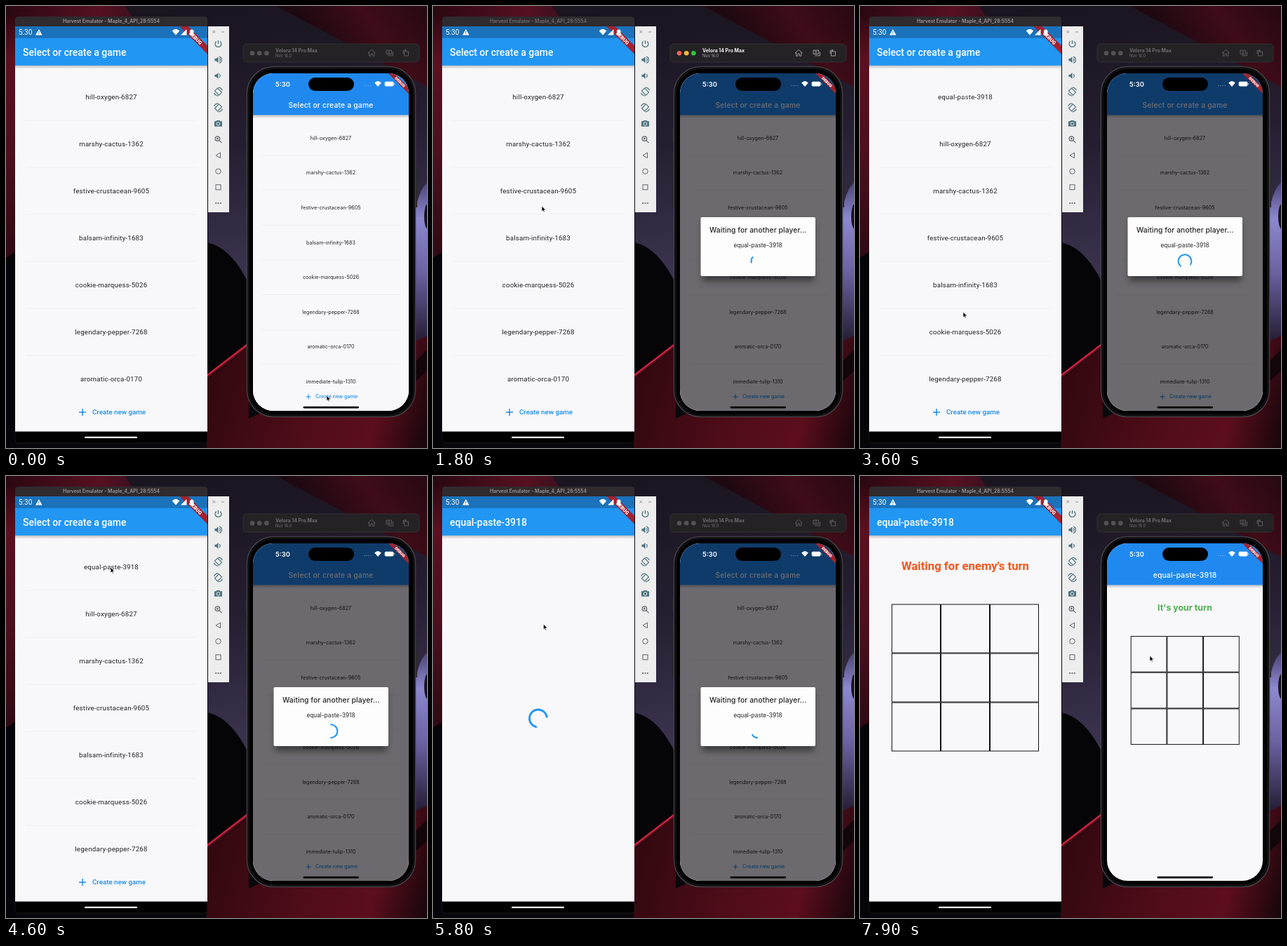
Write an HTML page that moves like this. It is 600x630 px and loops after 8 s.

```html
<!DOCTYPE html>
<html lang="en">
<head>
<meta charset="utf-8">
<title>Two emulators pairing a game</title>
<style>
html, body { margin: 0; width: 100%; height: 100%; overflow: hidden; background: #08070b; }
svg { display: block; width: 600px; height: 630px; }
.droid { font-family: Roboto, sans-serif; }
.phone { font-family: Inter, sans-serif; }
</style>
</head>
<body>
<svg id="stage" viewBox="0 0 600 630"></svg>
<script>
const BLUE = '#2196f3', PAPER = '#f8f7fa', INK = '#242326';
const games = ['hill-oxygen-6827', 'marshy-cactus-1362', 'festive-crustacean-9605', 'balsam-infinity-1683',
  'cookie-marquess-5026', 'legendary-pepper-7268', 'aromatic-orca-0170', 'immediate-tulip-1310'];
const newGame = 'equal-paste-3918', listTitle = 'Select or create a game';

const clamp = x => Math.max(0, Math.min(1, x));
const span = (t, from, to) => clamp((t - from) / (to - from));
const easeOut = (x, n) => 1 - (1 - x) ** n;

const rect = (x, y, w, h, fill, more = '') => `<rect x="${x}" y="${y}" width="${w}" height="${h}" fill="${fill}" ${more}/>`;
const path = (d, fill, more = '') => `<path d="${d}" fill="${fill}" ${more}/>`;
const line = (d, color, w = 1, more = '') => path(d, 'none', `stroke="${color}" stroke-width="${w}" ${more}`);
const disc = (x, y, r, fill, more = '') => `<circle cx="${x}" cy="${y}" r="${r}" fill="${fill}" ${more}/>`;
const text = (x, y, size, str, fill, weight = 400, more = '') =>
  `<text x="${x}" y="${y}" font-size="${size}" fill="${fill}" font-weight="${weight}" ${more}>${str}</text>`;
const mid = 'text-anchor="middle"';
const group = (attrs, body) => `<g ${attrs}>${body}</g>`;
const at = (x, y, body) => group(`transform="translate(${x} ${y})"`, body);
const gradient = (id, vec, ...stops) =>
  `<linearGradient id="${id}" gradientUnits="userSpaceOnUse" ${vec}>` +
  stops.map(([o, c, a = 1]) => `<stop offset="${o}" stop-color="${c}" stop-opacity="${a}"/>`).join('') + '</linearGradient>';
const vec = (x1, y1, x2, y2) => `x1="${x1}" y1="${y1}" x2="${x2}" y2="${y2}"`;

// Cubic timing curve (.4, 0, .2, 1)
function fastOutSlowIn(x) {
  let lo = 0, hi = 1, s = .5;
  for (let i = 0; i < 16; i++) {
    s = (lo + hi) / 2;
    const bx = 1.2 * s * (1 - s) ** 2 + .6 * s * s * (1 - s) + s ** 3;
    if (bx < x) lo = s; else hi = s;
  }
  return 3 * s * s * (1 - s) + s ** 3;
}

// Indeterminate ring: the arc grows, shrinks and rotates
function spinner(cx, cy, r, w, age) {
  const p = age / 1333 % 1, rot = age / 2222 % 1;
  const head = fastOutSlowIn(clamp(p * 2)), tail = fastOutSlowIn(clamp(p * 2 - 1));
  const a = Math.PI * (-.5 + tail * 1.5 + rot * 2 + p * .5);
  const sweep = Math.max(.02, (head - tail) * 1.5 * Math.PI), b = a + sweep;
  const pt = v => (cx + r * Math.cos(v)).toFixed(2) + ' ' + (cy + r * Math.sin(v)).toFixed(2);
  return line(`M${pt(a)}A${r} ${r} 0 ${+(sweep > Math.PI)} 1 ${pt(b)}`, BLUE, w);
}

function board(x, y, cell) {
  let s = '';
  for (let i = 0; i < 9; i++)
    s += rect(x + i % 3 * cell + .5, y + Math.floor(i / 3) * cell + .5, cell - 1, cell - 1, 'none', 'stroke="#111" stroke-width="1"');
  return s;
}

function list(names, x, y, step, size, left, right, spacing) {
  return names.map((n, i) => text(x, y + i * step + size * .35, size, n, INK, 400, `${mid} letter-spacing="${spacing}"`) +
    (i < names.length - 1 ? line(`M${left} ${y + (i + .5) * step}H${right}`, '#efeef1') : '')).join('');
}

const createButton = (px, py, r, tx, ty, size) =>
  line(`M${px - r} ${py}h${2 * r}M${px} ${py - r}v${2 * r}`, '#1b8ceb', r * .3) +
  text(tx, ty, size, 'Create new game', '#1b8ceb', 500);

// Corner ribbon measured in device pixels, s is the device scale
const debugBanner = (right, top, s) => group(`transform="translate(${right} ${top}) rotate(45) scale(${s})"`,
  rect(-40, 28, 80, 12, '#a3222f') + text(0, 37.7, 10.2, 'DEBUG', '#fff', 900, mid));

const wifi = (x, y, r) => path(`M${x} ${y}L${x - r} ${y - r * 1.15}Q${x} ${y - r * 2.2} ${x + r} ${y - r * 1.15}z`, '#fff');

/* ---------- fixed scenery ---------- */
const defs = '<defs>' +
  gradient('redLeft', vec(0, 0, 60, 370), [0, '#25070f'], [.2, '#5b1020'], [.55, '#4c101e'], [1, '#2a0912']) +
  gradient('topRed', vec(0, 0, 190, 0), [0, '#2a0811'], [.7, '#561021'], [1, '#38101e']) +
  gradient('violet', vec(300, 0, 350, 390), [0, '#1a151f'], [.5, '#251e31'], [1, '#3d3450']) +
  gradient('topRight', vec(470, 90, 600, 0), [0, '#1e0911'], [.5, '#3f0c18'], [1, '#260912']) +
  gradient('lilac', vec(0, 240, 0, 490), [0, '#3b3560'], [.25, '#8d87cf'], [.55, '#6c63a3'], [1, '#1c1426']) +
  gradient('bottom', vec(288, 550, 600, 630), [0, '#33080f'], [.5, '#520d1a'], [.75, '#5c0e1d'], [1, '#16060b']) +
  gradient('shade', vec(0, 0, 0, 5), [0, '#000', .22], [1, '#000', 0]) +
  '<clipPath id="droidClip"><rect x="13" y="29" width="274" height="577.5"/></clipPath>' +
  '<clipPath id="phoneClip"><rect x="352" y="96" width="222" height="481" rx="29"/></clipPath>' +
  '<filter id="soft" x="-20%" y="-30%" width="140%" height="170%"><feGaussianBlur stdDeviation="5"/></filter></defs>';

const wallpaper = rect(0, 0, 600, 630, '#08070b') +
  path('M0 0H170L190 30H0z', 'url(#topRed)') + rect(0, 14, 14, 346, 'url(#redLeft)') +
  path('M170 0H600V470L288 400V30H190z', 'url(#violet)') +
  path('M385 0H600V115z', 'url(#topRight)') +
  path('M0 359L14 350V630H0z', '#050408') +
  path('M286 337C308 341 328 359 346 396V630H286z', '#050508') +
  path('M584 288Q590 260 600 252V490L584 505z', 'url(#lilac)') +
  '<ellipse cx="601" cy="300" rx="5" ry="18" fill="#17121f"/>' +
  path('M286 532L346 486V588L600 470V630H286z', 'url(#bottom)') +
  path('M584 506L600 490V520L584 535z', '#12060b') +
  line('M286 528L346 482', '#5e1020', 5) + line('M286 527L346 481', '#d92740', 1.8);

const droidFrame = path('M13 30V20Q13 15 18 15H282Q287 15 287 20V30z', '#2f2b2f') +
  path('M13 606H287V618Q287 623 282 623H18Q13 623 13 618z', '#000', 'stroke="#29262a" stroke-width=".6"') +
  rect(112, 613.7, 75, 2.4, '#fff', 'rx="1.2"');

const droidStatus = debugBanner(287, 29, .697) + text(18, 41.3, 10, '5:30', '#fff') +
  path('M46.8 33L51.6 41.4H42z', '#fff') + line('M46.8 36v2.6M46.8 39.3v1', '#1b6fb4', 1) +
  wifi(242, 41.5, 5.2) + path('M257.5 33V41.5H249z', '#fff') +
  path('M262 34.5h1.5v-1h2.5v1h1.5V42H262z', '#fff');

const TEAL = '#4d737e', GRAY = '#606468';
const speaker = path('M-5-1.7h2.2L0-4.5v9L-2.8 1.7H-5z', TEAL) + line('M1.5-2.2a2.5 2.5 0 0 1 0 4.4', TEAL, 1.2);
const turn = line('M-5-1L-1-5L5 1L1 5zM0-6q4 0 6 4M0 6q-4 0-6-4', TEAL, 1.2);
const icons = [
  line('M-2.7-3.4a4.4 4.4 0 1 0 5.4 0M0-5V0', TEAL, 1.3),
  speaker + line('M1.5-4.6a4.8 4.8 0 0 1 0 9.2', TEAL, 1.2),
  speaker, turn, group('transform="scale(-1 1)"', turn),
  path('M-5.5-3.2h2.5l1-1.4h4l1 1.4h2.5v7.4h-11z', TEAL) + disc(0, .4, 2.3, 'none', 'stroke="#ededed" stroke-width="1"'),
  disc(-1.1, -1.1, 3.3, 'none', `stroke="${GRAY}" stroke-width="1.2"`) + line('M1.5 1.5L5 5M-2.6-1.1h3M-1.1-2.6v3', GRAY, 1.1),
  path('M3-3.8V3.8L-3.5 0z', 'none', `stroke="${GRAY}" stroke-width="1"`),
  disc(0, 0, 3.7, 'none', `stroke="${GRAY}" stroke-width="1"`),
  rect(-3.5, -3.5, 7, 7, 'none', `stroke="${GRAY}" stroke-width="1"`),
  [-3.3, 0, 3.3].map(x => disc(x, 0, 1.1, GRAY)).join('')
];
const toolbar = rect(288, 29, 30, 265, '#ededee') +
  line('M294.5 35l3.6 3.6M298.1 35l-3.6 3.6M307 37h4', '#777', .8) +
  icons.map((icon, i) => at(302.5, 54 + i * 22.7, icon)).join('');

const phoneFrame = [175, 208, 250].map((y, i) => rect(341, y, 3, i ? 37 : 18, '#29272a')).join('') +
  rect(583, 231, 3, 56, '#29272a') +
  rect(343.5, 86.5, 240, 499, '#020203', 'rx="38" stroke="#444246" stroke-width="1.5"') +
  rect(346, 89, 235, 494, 'none', 'rx="36" stroke="#17161a" stroke-width="1.5"');

const phoneStatus = group('clip-path="url(#phoneClip)"', debugBanner(574, 96, .516)) +
  rect(431, 102, 65, 19, '#000', 'rx="9.5"') + text(384, 114.6, 9.4, '5:30', '#fff', 600) +
  [511, 514, 517, 520].map(x => disc(x, 113.5, .7, '#fff', 'opacity=".4"')).join('') +
  wifi(530, 115, 4.8) + rect(539.7, 107.8, 12.8, 6.6, '#fff', 'rx="1.8"') + rect(553.3, 110, 1, 2.4, '#fff', 'opacity=".6"') +
  rect(423.5, 570.8, 79.5, 2.6, '#000', 'rx="1.3"');

/* ---------- left device ---------- */
const droidBar = title => rect(13, 29, 274, 55.8, BLUE) +
  at(0, 84.8, rect(13, 0, 274, 5, 'url(#shade)')) + text(24, 70.6, 13.95, title, '#fff', 500);

function droidList(t, scrim) {
  const names = t >= 3500 ? [newGame, ...games] : games;
  const body = t >= 4660 ? spinner(150, 345.5, 12.9, 2.8, t - 4660)
    : list(names.slice(0, 7), 150, 129.5, 67, 9.76, 28, 272, .17) + createButton(109, 579, 5, 123, 582.3, 9.76);
  return rect(13, 29, 274, 578, PAPER) + body + (scrim ? rect(13, 84, 274, 523, '#000', `opacity="${scrim}"`) : '') + droidBar(listTitle);
}

function droidGame(t) {
  const body = t < 6200 ? spinner(150, 345.5, 12.5, 2.8, t - 5040)
    : text(150, 134, 16.7, "Waiting for enemy's turn", '#f4561c', 700, mid) + board(45, 182.5, 70);
  return rect(13, 29, 274, 578, PAPER) + body + droidBar(newGame);
}

// Pull-to-refresh dial: drops in, then shrinks and fades
function refreshDial(t) {
  if (t < 2800 || t >= 3650) return '';
  const drop = span(t, 2800, 3200), scale = span(t, 3650, 3450);
  return group(`transform="translate(150 ${70 + 60 * drop}) scale(${scale})" opacity="${scale}"`,
    disc(0, 1, 14.6, '#000', 'opacity=".16"') + disc(0, 0, 14, '#fff') + spinner(0, 0, 6, 1.8, t - 2650));
}

const zoom = (s, body, alpha = 1) =>
  group(`transform="translate(150 317.5) scale(${s}) translate(-150 -317.5)" opacity="${alpha}"`, body);

function droid(t) {
  const p = span(t, 5040, 5340), e = easeOut(p, 2.36);
  const old = p < 1 ? zoom(1 + .045 * e, droidList(t, Math.min(.4, p * .75))) : '';
  const next = p > 0 ? zoom(.85 + .15 * e, droidGame(t), span(p, .15, .3)) : '';
  return old + refreshDial(t) + next + rect(13, 29, 274, 16.7, '#1b72ba');
}

/* ---------- right device ---------- */
const phoneBar = title => rect(352, 96, 222, 59.4, '#2089f0') + at(0, 155.4, rect(352, 0, 222, 4, 'url(#shade)')) +
  text(463, 144.7, 10.3, title, '#fff', 500, `${mid} letter-spacing=".2"`);

function phoneList(t) {
  return rect(352, 96, 222, 481, PAPER) + (t < 6550
    ? list(games, 463, 188.3, 49.6, 7.2, 364, 562, 0) + createButton(431, 557, 3.5, 441, 559.3, 7.2) : '') + phoneBar(listTitle);
}

function phoneGame(t) {
  const body = t < 7300 ? spinner(463, 366, 9.3, 2.06, t - 6590)
    : text(463, 192.3, 12.4, "It's your turn", '#4caf50', 700, mid) + board(385.7, 228, 51.7);
  return rect(352, 96, 222, 481, PAPER) + body + phoneBar(newGame);
}

const dialog = t => rect(384, 308, 159, 84, '#000', 'opacity=".45" filter="url(#soft)"') +
  rect(381.5, 301, 163.5, 84, '#fdfdfd', 'rx="2"') +
  text(394, 323.4, 10.3, 'Waiting for another player...', INK, 500, 'letter-spacing=".08"') +
  text(463, 343.8, 8.26, newGame, INK, 400, mid) + spinner(463, 363.7, 9.4, 2.06, t - 305);

function phone(t) {
  const x = span(t, 6590, 7090), slide = easeOut(x, 3.4), shown = span(t, 305, 455);
  let s = '';
  if (x < 1) {
    s += rect(352, 96, 222, 481, PAPER) + at(-74 * slide, 0, phoneList(t));
    if (shown) s += rect(352, 96, 222, 481, '#030106', `opacity="${.57 * shown - .25 * x}"`) +
      group(`opacity="${shown * (1 - x)}"`, dialog(t));
  }
  return x > 0 ? s + at(222 * (1 - slide), 0, phoneGame(t)) : s;
}

/* ---------- window titles, one window has the focus ---------- */
function titles(t) {
  const on = t >= 200 && t < 2600, ink = on ? '#f4f3f4' : '#716d70', icon = on ? '#aaa7aa' : '#656265';
  const lights = on ? ['#ff5f57', '#febc2e', '#28c840'] : Array(3).fill('#555155');
  return text(150, 24, 6.9, 'Harvest Emulator - Maple_4_API_28:5554', on ? '#716d70' : '#9c989b', 600, mid) +
    rect(338, 54, 251, 26, '#252225', 'rx="5" stroke="#3a373a" stroke-width=".7"') +
    lights.map((c, i) => disc(351 + i * 10.2, 67.3, 3.3, c)).join('') +
    text(384, 66, 6.9, 'Velora 14 Pro Max', ink, 700) + text(384, 73.3, 5.7, 'Nuv 16.0', on ? '#a5a2a5' : ink) +
    line('M516 67l5.2-4.7l5.2 4.7M517.5 66v5.2h2.5v-3.2h2.4v3.2h2.5V66M542 63h7.5v5.5H542zM544 70.8h7.5V65M567.5 65h6v6h-6zM566 68v-4.6h4M568.6 61.6l1.8 1.8l-1.8 1.8', icon, .9) +
    disc(545.7, 65.8, 1.4, 'none', `stroke="${icon}" stroke-width=".8"`);
}

/* ---------- pointer ---------- */
const stops = [[0, 457, 555], [350, 457, 555], [1000, 219, 553], [1600, 155, 285], [2700, 155, 285], [3300, 147, 436],
  [3700, 147, 436], [4400, 149, 130], [4700, 149, 130], [5100, 149, 206], [5700, 149, 206], [6600, 394, 351],
  [6800, 394, 351], [7400, 413, 256], [8000, 413, 256]];

function pointer(t) {
  const i = stops.findIndex(s => s[0] > t), [a, ax, ay] = stops[i - 1], [b, bx, by] = stops[i];
  const p = span(t, a, b), e = p * p * (3 - 2 * p);
  return at(ax + (bx - ax) * e, ay + (by - ay) * e,
    path('M0 0V8L1.8 6.4L3 9.1L4.3 8.5L3.1 5.9H5.6z', '#000', 'stroke="#fff" stroke-width=".7"'));
}

const layer = (id, attrs = '') => `<g id="${id}" ${attrs}></g>`;
const get = id => document.getElementById(id);
get('stage').innerHTML = defs + wallpaper +
  group('class="droid"', droidFrame + group('clip-path="url(#droidClip)"', layer('droidApp') + droidStatus)) + toolbar +
  group('class="phone"', phoneFrame + layer('phoneApp', 'clip-path="url(#phoneClip)"') + phoneStatus + layer('titles')) +
  layer('mouse');

let last = -1;
function frame() {
  const t = Math.floor(performance.now() % 8000 / 100) * 100;
  if (t !== last) {
    last = t;
    get('droidApp').innerHTML = droid(t);
    get('phoneApp').innerHTML = phone(t);
    get('titles').innerHTML = titles(t);
    get('mouse').innerHTML = pointer(t);
  }
  requestAnimationFrame(frame);
}
frame();
</script>
</body>
</html>
```
